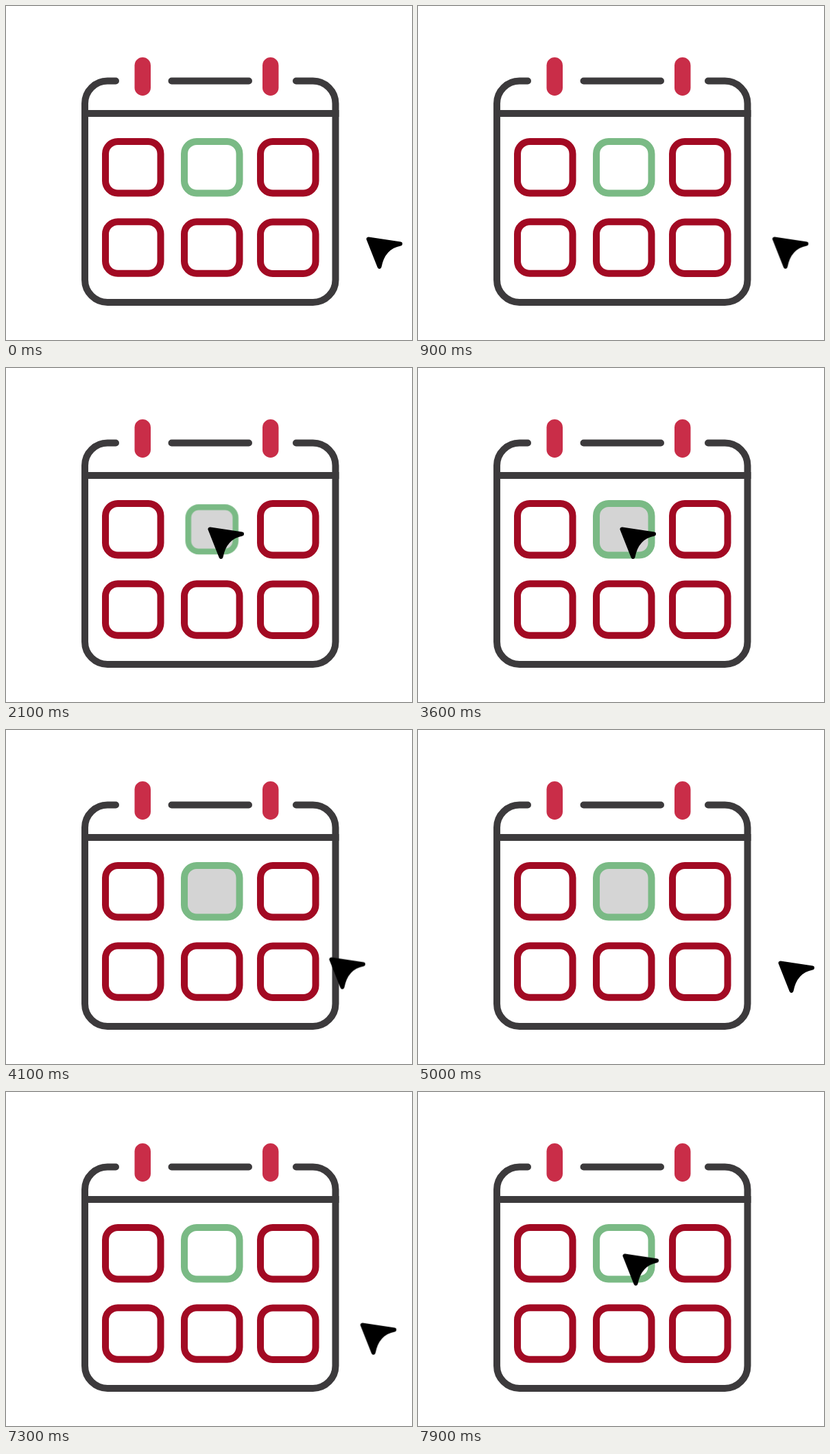
These frames come from a looping animation (592 by 488 pixels, 8000 ms). An HTML page without scripts:

```html
<!DOCTYPE html>
<html lang="en">
<head>
<meta charset="utf-8">
<title>Pick a date</title>
<style>
  html, body { margin: 0; width: 100%; height: 100%; overflow: hidden; background: #fff; }
  svg { display: block; width: 592px; height: 488px; }

  .frame { fill: none; stroke: #3c3a3c; stroke-width: 10; }
  .ring { fill: #c92d48; }
  .day { fill: none; stroke: #a20a23; stroke-width: 10; }
  .picked { stroke: #7aba85; }
  .fill { fill: #d4d4d4; }
  .arrow { stroke: #000; stroke-width: 6; stroke-linejoin: round; }

  .press, .fill, .cursor, .arrow { animation: 8s linear infinite; }
  .press, .arrow { transform-box: fill-box; transform-origin: center; }
  .press { animation-name: press; }
  .fill { animation-name: fill; }
  .arrow { animation-name: click; }
  .cursor {
    offset-path: path("M231 105Q110 105 0 0");
    offset-rotate: 0deg;
    animation-name: travel;
  }

  /* to the day, back out, then off again until the loop cuts */
  @keyframes travel {
    0% { offset-distance: 0%; }
    10% { offset-distance: 0%; animation-timing-function: cubic-bezier(.42, 0, .04, 1); }
    21.25% { offset-distance: 100%; }
    46.25% { offset-distance: 100%; animation-timing-function: cubic-bezier(.42, 0, .04, 1); }
    57.5% { offset-distance: 0%; }
    90% { offset-distance: 0%; animation-timing-function: cubic-bezier(.4525, 0, .0776, .926); }
    100% { offset-distance: 99.53%; }
  }
  @keyframes press {
    0%, 21.25% { transform: scale(1); animation-timing-function: ease-in-out; }
    26.875% { transform: scale(.853); animation-timing-function: ease-in-out; }
    32.5%, 100% { transform: scale(1); }
  }
  @keyframes click {
    0%, 32.5% { transform: scale(1); animation-timing-function: ease-in-out; }
    38.125% { transform: scale(.853); animation-timing-function: ease-in-out; }
    43.75%, 100% { transform: scale(1); }
  }
  @keyframes fill {
    0%, 21.25% { opacity: 0; animation-timing-function: ease-in-out; }
    26.875%, 61.25% { opacity: 1; animation-timing-function: ease-in-out; }
    72.5%, 100% { opacity: 0; }
  }
</style>
</head>
<body>
<svg viewBox="0 0 592 488">
  <defs>
    <rect id="box" width="80.5" height="75.5" rx="18"/>
  </defs>

  <g class="frame">
    <path stroke-linecap="round" d="M160 109.5H148A33 33 0 0 0 115 142.5V400A33 33 0 0 0 148 433H447.5A33 33 0 0 0 480.5 400V142.5A33 33 0 0 0 447.5 109.5H423M241.5 109.5H354"/>
    <path d="M115 157H485.5"/>
  </g>
  <rect class="ring" x="187.5" y="75" width="23.5" height="56" rx="11.75"/>
  <rect class="ring" x="374" y="75" width="23.5" height="56" rx="11.75"/>

  <g class="day">
    <use href="#box" x="145" y="198"/>
    <use href="#box" x="371" y="198"/>
    <use href="#box" x="145" y="315.3"/>
    <use href="#box" x="260" y="315.3"/>
    <use href="#box" x="371" y="315.5"/>
  </g>

  <g class="press">
    <use class="fill" href="#box" x="260" y="198"/>
    <use class="day picked" href="#box" x="260" y="198"/>
  </g>

  <g class="cursor">
    <path class="arrow" d="M297.5 235.5L344 242.5Q319 247 313.5 276Z"/>
  </g>
</svg>
</body>
</html>
```
